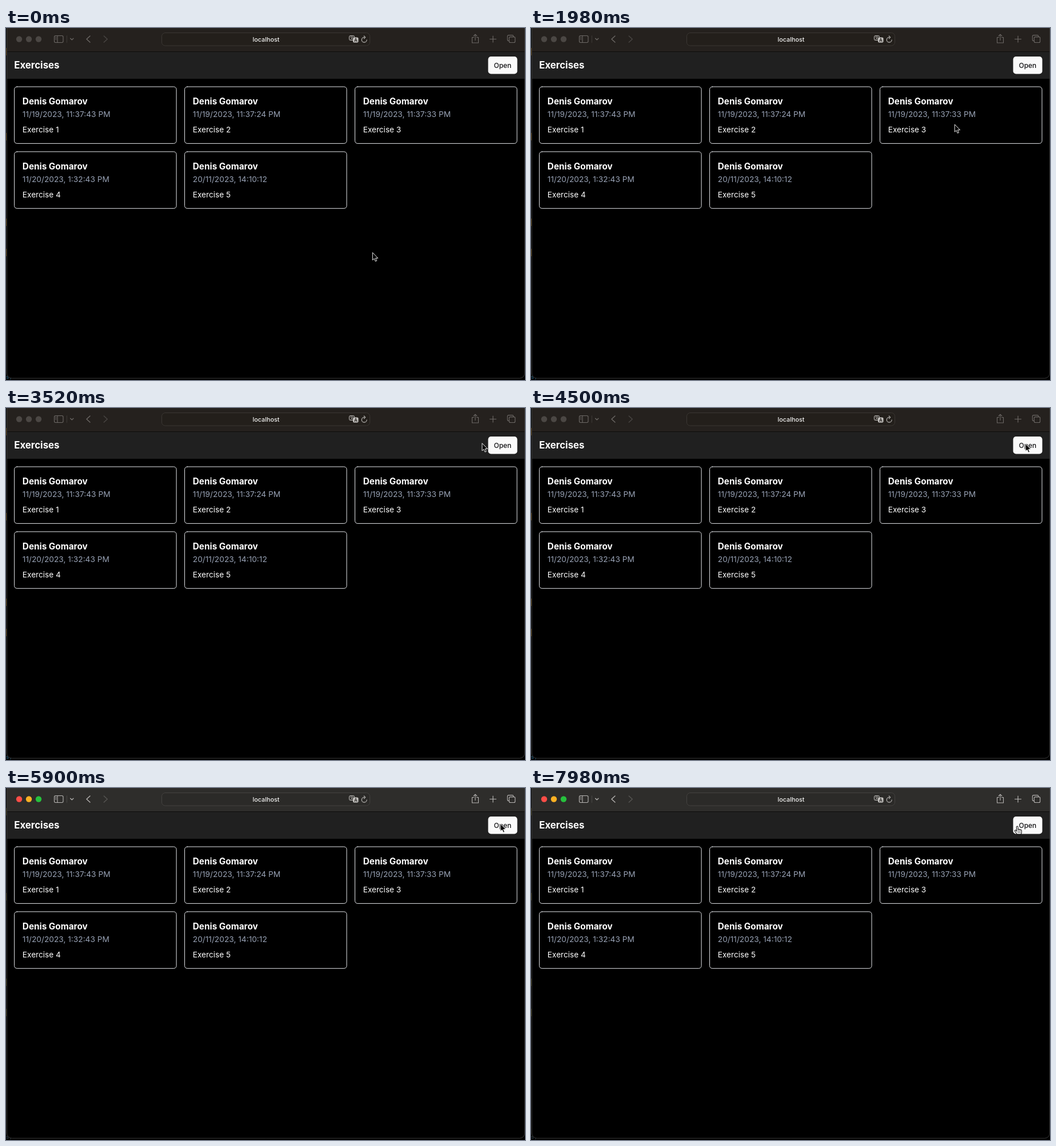
These frames come from a looping animation (908x617 px, 8 s). An HTML page with a canvas:

```html
<!DOCTYPE html>
<html lang="en">
<head>
<meta charset="utf-8">
<title>Exercises</title>
<style>
html, body { margin: 0; width: 100%; height: 100%; overflow: hidden; background: #000; }
canvas { display: block; width: 908px; height: 617px; }
</style>
</head>
<body>
<canvas id="stage"></canvas>
<script>
const W = 908, H = 617, LOOP = 8000;
const FOCUS_AT = 5040, HAND_AT = 5960;
const ZOOM = 0.85; // page zoom: 16px text shows as 13.6px
const REM = 16 * ZOOM;
const FONT = 'Inter, "Noto Sans", sans-serif';
const AUTHOR = 'Denis Gomarov';
const DATES = [
  '11/19/2023, 11:37:43 PM', '11/19/2023, 11:37:24 PM', '11/19/2023, 11:37:33 PM',
  '11/20/2023, 1:32:43 PM', '20/11/2023, 14:10:12'
];
const HOME = { x: 641.3, y: 394 };
const MOVES = [
  { from: 20, to: 820, x: 715.3, y: 204 },
  { from: 1640, to: 2700, x: 821.6, y: 61.8 },
  { from: 3240, to: 4080, x: 865.2, y: 63 },
  { from: 5860, to: 6460, x: 856, y: 66.5 },
  { from: 7540, to: 7900, x: 851, y: 67 }
];

const canvas = document.getElementById('stage');
const ctx = canvas.getContext('2d');
const ratio = window.devicePixelRatio || 1;
canvas.width = W * ratio;
canvas.height = H * ratio;

function rect(x, y, w, h, color) {
  ctx.fillStyle = color;
  ctx.fillRect(x, y, w, h);
}

function round(x, y, w, h, r, fill, stroke, width = 1) {
  ctx.beginPath();
  ctx.roundRect(x, y, w, h, r);
  if (fill) { ctx.fillStyle = fill; ctx.fill(); }
  if (stroke) { ctx.strokeStyle = stroke; ctx.lineWidth = width; ctx.stroke(); }
}

function line(color, width, ...points) {
  ctx.beginPath();
  for (const [x, y] of points) ctx.lineTo(x, y);
  ctx.strokeStyle = color;
  ctx.lineWidth = width;
  ctx.stroke();
}

// Open wedge with its tip at (x, y); dx or dy gives the way it points.
function chevron(x, y, dx, dy, half, color, width) {
  const side = s => dx ? [x - dx, y + s * half] : [x + s * half, y - dy];
  line(color, width, side(-1), [x, y], side(1));
}

function text(str, x, y, size, weight, color, align = 'left') {
  ctx.font = `${weight} ${size}px ${FONT}`;
  ctx.textAlign = align;
  ctx.fillStyle = color;
  ctx.fillText(str, x, y);
}

function drawBackdrop(active) {
  rect(0, 0, W, H, '#000');
  for (const y of [35, 184, 334, 387]) rect(0, y, 1, 13, active ? '#2b2508' : '#4a3004');
  ctx.font = '9px "DejaVu Sans Mono", monospace';
  ctx.textAlign = 'left';
  ctx.fillStyle = active ? '#33444e' : '#2d6a8d';
  ctx.fillText('s)', 0, 615);
  round(1.5, -12, 906, 626, 9, '#000', '#383838');
}

function drawTranslate(x, y, color, back) {
  round(x, y, 9, 8, 2, back, color);
  text('文', x + 4.5, y + 6.6, 7, 400, color, 'center');
  round(x + 6.5, y + 3, 9.5, 9, 2, color);
  text('A', x + 11.3, y + 10.4, 8, 600, back, 'center');
}

function drawReload(x, y, color) {
  ctx.beginPath();
  ctx.arc(x, y, 4.4, 0, Math.PI * 1.5);
  ctx.strokeStyle = color;
  ctx.lineWidth = 1.1;
  ctx.stroke();
  chevron(x + 2, y - 4.4, 2.4, 0, 2.4, color, 1.1);
}

function drawShare(x, y, color) {
  line(color, 1.1, [x - 2.5, y - 3], [x - 5.5, y - 3], [x - 5.5, y + 6.5],
    [x + 5.5, y + 6.5], [x + 5.5, y - 3], [x + 2.5, y - 3]);
  line(color, 1.1, [x, y + 2], [x, y - 8]);
  chevron(x, y - 8.3, 0, -2.8, 2.8, color, 1.1);
}

function drawToolbar(active) {
  const bar = active ? '#2e2d2b' : '#25211e';
  const field = active ? '#2b2a28' : '#231f1b';
  const icon = active ? '#b7b5b3' : '#6d6966';
  const faint = active ? '#575553' : '#4a4643';
  const mid = 19.5;

  rect(2, 0, 905, 41, bar);
  rect(2, 41, 905, 1, '#0d0c0b');
  ['#fe4d47', '#feb123', '#26c13d'].forEach((color, i) =>
    round(17.8 + 17 * i, mid - 5.2, 10.4, 10.4, 5.2, active ? color : '#4b4744'));

  ctx.lineCap = ctx.lineJoin = 'round';
  round(84.5, mid - 6, 15.5, 12, 2.2, null, icon, 1.1);
  line(icon, 1.1, [90, mid - 6], [90, mid + 6]);
  for (let i = 0; i < 3; i++) line(icon, 0.8, [86.3, 16 + 2 * i], [88, 16 + 2 * i]);
  line(faint, 0.7, [106.5, mid - 6], [106.5, mid + 6]);
  chevron(115.3, 20.7, 0, 2.5, 2.6, icon, 1.3);
  chevron(141, mid, -6, 0, 5.5, icon, 1.4);
  chevron(177.3, mid, 6, 0, 5.5, faint, 1.4);

  round(272.5, 8.5, 364, 22.5, 6, field, active ? '#444240' : '#3b3733');
  text('localhost', 455, 23.8, 10.8, 500, '#f4f4f3', 'center');
  drawTranslate(600.5, 13.5, '#c3c1be', field);
  drawReload(626.7, 20.7, '#c3c1be');

  drawShare(821, mid, icon);
  line(icon, 1.2, [846.5, mid], [857.5, mid]);
  line(icon, 1.2, [852, mid - 5.5], [852, mid + 5.5]);
  for (const shift of [0, 3]) round(877.3 + shift, 12.6 + shift, 10.4, 9.9, 2, bar, icon, 1.1);
}

function drawCard(date, i) {
  const gap = REM + ZOOM, w = 283.5, h = 99.4;
  const x = 14.6 + (w + gap) * (i % 3);
  const y = 103 + (h + gap) * Math.floor(i / 3);
  const left = x + gap - 0.2;
  round(x, y, w, h, 4.6, null, '#e5e7eb');
  text(AUTHOR, left, y + 31, 18 * ZOOM, 700, '#fff');
  text(date, left, y + 53.3, REM * 1.01, 400, '#98a2b5');
  text(`Exercise ${i + 1}`, left, y + 80.3, REM, 400, '#fff');
}

function drawPage() {
  rect(2, 42, 905, 47, '#202020');
  text('Exercises', 14.2, 71.3, 16.8, 700, '#fff');
  round(843.5, 50, 51, 30.6, 6 * ZOOM, '#fafafa');
  text('Open', 868.9, 69.8, 14 * ZOOM, 500, '#111113', 'center');
  DATES.forEach(drawCard);
}

function drawArrow() {
  const shape = new Path2D('M0 0V12.8L3 10.2L5 15L7.2 14L5.2 9.4H9Z');
  ctx.lineWidth = 1;
  ctx.fillStyle = '#000';
  ctx.strokeStyle = '#eee';
  ctx.fill(shape);
  ctx.stroke(shape);
}

// A dark pass slightly larger than the light one leaves an even outline.
function drawHand() {
  for (const [grow, color] of [[0.6, '#000'], [-0.4, '#fff']]) {
    const part = (x, y, w, h) =>
      round(x - grow, y - grow, w + 2 * grow, h + 2 * grow, 1.2 + grow, color);
    line(color, 2.2 + 2 * grow, [-3.6, 8], [-0.6, 12]);
    part(-1.5, 0, 2.4, 10);
    for (let i = 0; i < 3; i++) part(0.8 + 2 * i, 5 + i * 0.5, 2.2, 6);
    part(-1.4, 8, 8.2, 6);
  }
  for (let i = 0; i < 3; i++) line('#000', 0.6, [0.9 + 2 * i, 9.2], [0.9 + 2 * i, 11.6]);
}

function pointerAt(t) {
  return MOVES.reduce((pos, move) => {
    const u = Math.min(1, Math.max(0, (t - move.from) / (move.to - move.from)));
    const k = u * u * (3 - 2 * u);
    return { x: pos.x + (move.x - pos.x) * k, y: pos.y + (move.y - pos.y) * k };
  }, HOME);
}

function draw(t) {
  const active = t >= FOCUS_AT;
  const { x, y } = pointerAt(t);
  ctx.setTransform(ratio, 0, 0, ratio, 0, 0);
  drawBackdrop(active);
  drawToolbar(active);
  drawPage();
  ctx.translate(x, y);
  if (t >= HAND_AT) drawHand();
  else drawArrow();
}

const start = performance.now();
function tick() {
  draw((performance.now() - start) % LOOP);
  requestAnimationFrame(tick);
}
tick();
</script>
</body>
</html>
```
